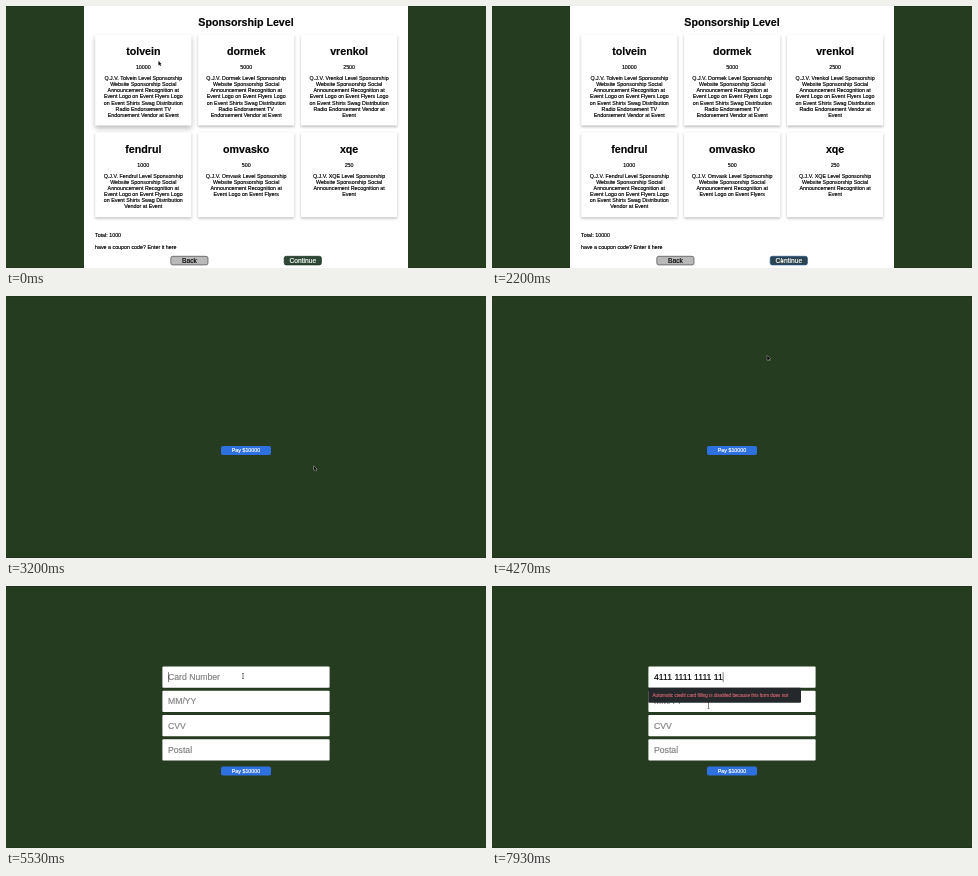
An HTML page with a canvas that plays this animation: 480 by 262 pixels, repeating every 8000 ms.

```html
<!DOCTYPE html>
<html lang="en">
<head>
<meta charset="utf-8">
<title>Sponsorship checkout</title>
<style>
  html, body { margin: 0; width: 100%; height: 100%; overflow: hidden; background: #263c20; }
  canvas { display: block; width: 480px; height: 262px; }
</style>
</head>
<body>
<canvas id="stage"></canvas>
<script>
const W = 480, H = 262, LOOP = 8000;
const SMALL = 16 / 3, MEDIUM = 20 / 3, INPUT = 26 / 3, LARGE = 32 / 3;
const FONT = '"Liberation Sans", Arial, sans-serif';
const canvas = document.getElementById('stage');
const ctx = canvas.getContext('2d');
const ratio = window.devicePixelRatio || 1;
canvas.width = W * ratio;
canvas.height = H * ratio;

// Moments of the story
const TOTAL = 530, FOCUS = 2200, PAY = 2330, MOUNT = 3070, FORM = 4470;
const CLICK = 5530, BLINK = 6000, TYPE = 6330, WARN = 6530, RESUME = 6870, RETURN = 7300;

const perks = ['Website Sponsorship', 'Social Announcement', 'Recognition at Event',
  'Logo on Event Flyers', 'Logo on Event Shirts', 'Swag Distribution',
  'Radio Endorsement', 'TV Endorsement'];
const levels = [
  { name: 'tolvein', price: 10000, perks: 8 },
  { name: 'dormek', price: 5000, perks: 8 },
  { name: 'vrenkol', price: 2500, perks: 7 },
  { name: 'fendrul', price: 1000, perks: 6 },
  { name: 'omvasko', price: 500, perks: 4, label: 'Omvask' },
  { name: 'xqe', price: 250, perks: 3, label: 'XQE' }
];
const fields = ['Card Number', 'MM/YY', 'CVV', 'Postal'];

const setFont = (size, weight = 400) => ctx.font = `${weight} ${size}px ${FONT}`;

function wrap(str, width) {
  const lines = [];
  let line = '';
  for (const word of str.split(' ')) {
    const next = line ? line + ' ' + word : word;
    if (ctx.measureText(next).width > width) {
      lines.push(line);
      line = word;
    } else line = next;
  }
  return [...lines, line];
}

setFont(SMALL);
for (const level of levels) {
  const label = level.label || level.name[0].toUpperCase() + level.name.slice(1);
  const list = perks.slice(0, level.perks);
  if (level.price >= 1000) list.push('Vendor at Event');
  level.lines = wrap(`Q.J.V. ${label} Level Sponsorship ${list.join(' ')}`, 85);
}

// Pointer moves: begin, end, x, y
const moves = [
  [800, 1270, 301, 250], [1500, 1710, 196, 222], [1710, 1930, 289.5, 252],
  [2640, 3470, 314, 143], [3500, 3730, 281, 60], [4050, 4730, 258, 59],
  [4870, 5170, 311, 141], [5170, CLICK, 237, 90], [RETURN, 7670, 216.5, 119.5]
];

function pointerAt(t) {
  let x = 152.5, y = 55;
  for (const [begin, end, toX, toY] of moves) {
    const p = Math.min(1, Math.max(0, (t - begin) / (end - begin)));
    const e = p * p * (3 - 2 * p);
    x += (toX - x) * e;
    y += (toY - y) * e;
  }
  return { x, y };
}

function text(str, x, y, size, color = '#000', align = 'left', weight = 400) {
  setFont(size, weight);
  ctx.textAlign = align;
  ctx.fillStyle = ctx.strokeStyle = color;
  ctx.lineWidth = 0.16;
  ctx.strokeText(str, x, y);
  ctx.fillText(str, x, y);
}

function box(r, radius, fill, stroke) {
  ctx.beginPath();
  ctx.roundRect(r.x, r.y, r.w, r.h, radius);
  ctx.fillStyle = fill;
  ctx.fill();
  if (stroke) {
    ctx.strokeStyle = stroke;
    ctx.lineWidth = 0.7;
    ctx.stroke();
  }
}

const inside = (p, r) => p.x >= r.x && p.x <= r.x + r.w && p.y >= r.y && p.y <= r.y + r.h;

const back = { x: 164.8, y: 250.3, w: 37.2, h: 8.6 };
const next = { ...back, x: 278.2 };
const fieldRect = i => ({ x: 156.4, y: 80.5 + i * 24.25, w: 167.2, h: 21.2 });
const payRect = t => ({ x: 215, y: t < MOUNT ? 132 : t < FORM ? 150 : 180.5, w: 50, h: 9 });

function drawCard(level, i, pos) {
  const row = Math.floor(i / 3);
  const r = { x: 89.2 + (i % 3) * 102.9, y: 28.6 + row * 97.7, w: 96.2, h: 91 - row * 6.13 };
  const mid = r.x + r.w / 2;
  const lift = inside(pos, r) ? 2 : 1;
  ctx.save();
  ctx.shadowColor = 'rgba(0,0,0,.28)';
  ctx.shadowBlur = 2.7 * lift * ratio;
  ctx.shadowOffsetY = 1.3 * lift * ratio;
  box(r, 0.5, '#fff');
  ctx.restore();
  text(level.name, mid, r.y + 20.2, LARGE, '#000', 'center', 700);
  text(level.price, mid, r.y + 34.5, SMALL, '#000', 'center');
  level.lines.forEach((line, n) =>
    text(line, mid, r.y + 45.4 + n * SMALL * 1.15, SMALL, '#000', 'center'));
}

function button(r, label, size, fill, color, stroke) {
  box(r, 2, fill, stroke);
  text(label, r.x + r.w / 2, r.y + r.h / 2 + size * 0.36, size, color, 'center');
}

function drawLevels(t, pos) {
  ctx.fillStyle = '#fff';
  ctx.fillRect(78, 0, 324, H);
  text('Sponsorship Level', 240, 19.8, LARGE, '#000', 'center', 700);
  levels.forEach((level, i) => drawCard(level, i, pos));
  text('Total: ' + (t < TOTAL ? 1000 : 10000), 89, 231.4, SMALL);
  text('have a coupon code? Enter it here', 89, 242.6, SMALL);
  const focus = t >= FOCUS;
  button(back, 'Back', MEDIUM, '#b9b9b9', '#000', '#4a4a4a');
  button(next, 'Continue', MEDIUM, focus ? '#2b4550' : '#2d4936', '#fff', focus ? '#24508a' : '#1b2b20');
}

function typed(t) {
  const n = t < TYPE ? 0 : t < WARN ? 1 : t < RESUME ? 2 : Math.min(14, 3 + Math.floor((t - RESUME) / 96));
  return '4111 1111 1111 11'.slice(0, n + Math.max(0, Math.floor((n - 1) / 4)));
}

function drawForm(t) {
  const digits = typed(t);
  fields.forEach((name, i) => {
    const r = fieldRect(i);
    const value = i === 0 && digits;
    box(r, 1, '#fff');
    text(value || name, 162, r.y + 13.7, INPUT, value ? '#000' : '#7f7f7f');
  });
  if (t >= TYPE || (t >= CLICK && t < BLINK)) {
    setFont(INPUT);
    ctx.fillStyle = '#000';
    ctx.fillRect(162 + ctx.measureText(digits).width, 86.2, 0.5, 9.8);
  }
  if (t >= WARN) {
    box({ x: 156.3, y: 101.8, w: 152.7, h: 15 }, 1, '#25282a');
    text('Automatic credit card filling is disabled because this form does not',
      160.5, 111.2, 4.65, '#c2626b');
  }
}

function drawPointer(t, pos) {
  if (t >= TYPE && t < RETURN) return;
  const targets = t < PAY ? [back, next] : [payRect(t)];
  ctx.save();
  ctx.translate(pos.x, pos.y);
  if (t >= FORM && fields.some((_, i) => inside(pos, fieldRect(i)))) {
    ctx.fillStyle = '#333';
    ctx.fillRect(-0.3, -2.8, 0.6, 5.6);
    ctx.fillRect(-1, -3, 2, 0.5);
    ctx.fillRect(-1, 2.5, 2, 0.5);
  } else if (targets.some(r => inside(pos, r))) {
    box({ x: -0.5, y: 0, w: 1, h: 4 }, 0.5, '#fff');
    box({ x: -0.8, y: 2, w: 3, h: 3 }, 1, '#fff', '#444');
  } else {
    ctx.strokeStyle = '#ddd';
    ctx.lineWidth = 0.7;
    const outline = new Path2D('M0 0V4.4L1 3.5L1.7 5L2.4 4.7L1.7 3.2H3Z');
    ctx.stroke(outline);
    ctx.fillStyle = '#000';
    ctx.fill(outline);
  }
  ctx.restore();
}

function draw(t) {
  const pos = pointerAt(t);
  ctx.setTransform(ratio, 0, 0, ratio, 0, 0);
  ctx.fillStyle = '#20331b';
  ctx.fillRect(0, 0, W, H);
  ctx.fillStyle = '#263c20';
  ctx.fillRect(0, 0.7, W, H - 1.4);
  if (t < PAY) drawLevels(t, pos);
  else {
    if (t >= FORM) drawForm(t);
    button(payRect(t), 'Pay $10000', SMALL, '#2f70e0', '#fff');
  }
  drawPointer(t, pos);
}

const start = performance.now();
function tick() {
  draw((performance.now() - start) % LOOP);
  requestAnimationFrame(tick);
}
tick();
</script>
</body>
</html>
```
